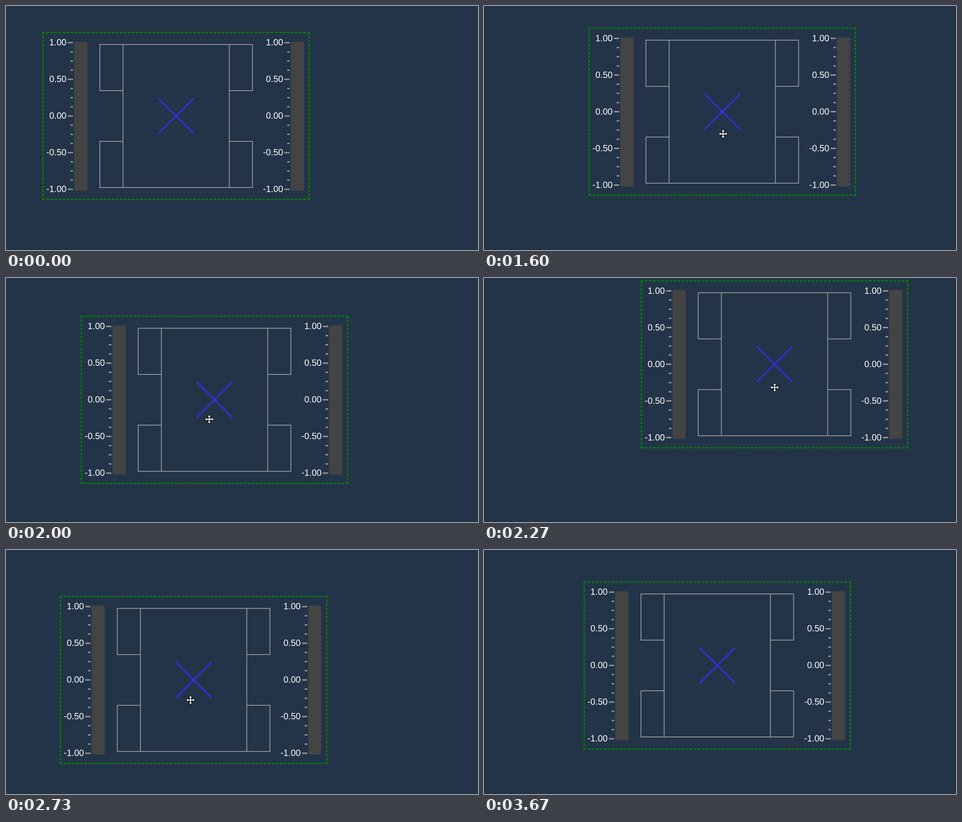
These frames come from a looping animation (1039 by 539 pixels, 3870 ms). An HTML page:

```html
<!DOCTYPE html>
<html lang="en">
<head>
<meta charset="utf-8">
<title>Dragging a drivetrain widget</title>
<style>
html, body { margin: 0; width: 100%; height: 100%; overflow: hidden; background: #233448; }
#panel { position: absolute; left: 0; top: 0; width: 589px; height: 372px; box-sizing: border-box; border: 3px dashed green; }
#panel svg { position: absolute; left: -3px; top: -3px; }
#top { position: absolute; left: 0; top: 0; }
text { font: 19.4px "Liberation Sans", Arial, sans-serif; fill: #fff; text-anchor: end; }
#top path { fill: #fff; stroke: #000; stroke-width: 2; paint-order: stroke; }
</style>
</head>
<body>
<div id="panel">
  <svg width="589" height="372" fill="none">
    <g id="gauges"></g>
    <path id="chassis" stroke="#aaa" stroke-width="1.5"/>
    <path stroke="#3030ff" stroke-width="2.7" d="M255.5 147l78 78m0-78l-78 78"/>
  </svg>
</div>
<svg id="top" width="1039" height="539">
  <rect y="538" width="1039" height="1" fill="#1e2b3d"/>
  <path id="arrow" d="M1 2V15L4.2 12 6.8 17.5 8.2 17 5.8 11H10Z"/>
  <path id="move"/>
</svg>
<script>
const LOOP = 3870, FPS = 15, GRAB = 20, DROP = 46, LEAD = .2;
const WIDTH = 589, HEIGHT = 372, GRIP = [286.5, 234.5];
const $ = id => document.getElementById(id);

// Key points of each path: [step, x, y]
const dragPath = [
  [20, 80, 57], [24, 230, 47.5], [26, 338, 68], [28, 275, 108], [30, 164.5, 83], [32, 190, 13],
  [34, 345, 4.5], [36, 365, 55], [39, 160, 122], [41, 118.5, 101], [43, 165, 55], [46, 219, 69]
];
const enterPath = [[-1, 970, 543], [8, 771, 426], [16, 441.5, 320.5], [19, 366.5, 291.5]];
const leavePath = [[48, 505.5, 303.5], [56, 0, 570]];

// Smooth curve through the points, at rest at both ends
function sample(path, n) {
  const last = path.length - 1;
  n = Math.min(Math.max(n, path[0][0]), path[last][0]);
  const i = Math.max(path.findIndex(k => k[0] >= n) - 1, 0);
  const a = path[i], b = path[i + 1], d = b[0] - a[0], u = (n - a[0]) / d;
  const slope = (j, c) => j % last === 0 ? 0
    : (path[j + 1][c] - path[j - 1][c]) / (path[j + 1][0] - path[j - 1][0]) * d;
  return [1, 2].map(c => {
    const ma = slope(i, c), mb = slope(i + 1, c), s = a[c] - b[c];
    return a[c] + u * (ma + u * (-3 * s - 2 * ma - mb + u * (2 * s + ma + mb)));
  });
}

function gauge(x) {
  let out = `<rect x="${x + 70}" y="22" width="29" height="329" rx="4" fill="#444"/>`;
  for (let i = 0; i <= 16; i++) {
    const y = 24 + i * 20.25, major = i % 4 === 0;
    out += `<path stroke="#999" stroke-width="2.8" d="M${x + 67.5} ${y}h${major ? -11.5 : -5.5}"/>`;
    if (major) out += `<text x="${x + 53}" y="${y + 6.3}">${(1 - i / 8).toFixed(2)}</text>`;
  }
  return out;
}

const box = (x, y, w, h) => `M${x} ${y}h${w}v${h}h${-w}z`;
const wheels = [126.5, 411.5].flatMap(x => [28, 242].map(y => box(x, y, 51, 102)));
$("chassis").setAttribute("d", box(177.5, 28, 234, 316) + wheels.join(""));
$("gauges").innerHTML = gauge(0) + gauge(477);

// Four arrows: one arm turned by quarter circles
const arm = [[-1, -1], [-1, -5.5], [-3.5, -5.5], [0, -9], [3.5, -5.5], [1, -5.5]];
const turn = ([x, y]) => [-y, x];
const arms = [arm];
while (arms.length < 4) arms.push(arms.at(-1).map(turn));
$("move").setAttribute("d", `M${arms.flat().join(" ")}Z`);

function pointer(n) {
  if (n <= GRAB) return sample(enterPath, n);
  if (n > DROP) return sample(leavePath, n);
  return sample(dragPath, n + LEAD).map((v, i) => v + GRIP[i]);
}

function draw(now) {
  const n = Math.floor((now % LOOP + 4) * FPS / 1000);
  const [px, py] = sample(dragPath, n), [x, y] = pointer(n);
  const inside = x > px && x < px + WIDTH && y > py && y < py + HEIGHT;
  $("panel").style.transform = `translate(${px}px, ${py}px)`;
  for (const [id, on] of [["arrow", !inside], ["move", inside]]) {
    $(id).setAttribute("transform", `translate(${x} ${y})`);
    $(id).setAttribute("visibility", on ? "visible" : "hidden");
  }
}

const start = performance.now();
function tick() {
  draw(performance.now() - start);
  requestAnimationFrame(tick);
}
tick();
</script>
</body>
</html>
```
